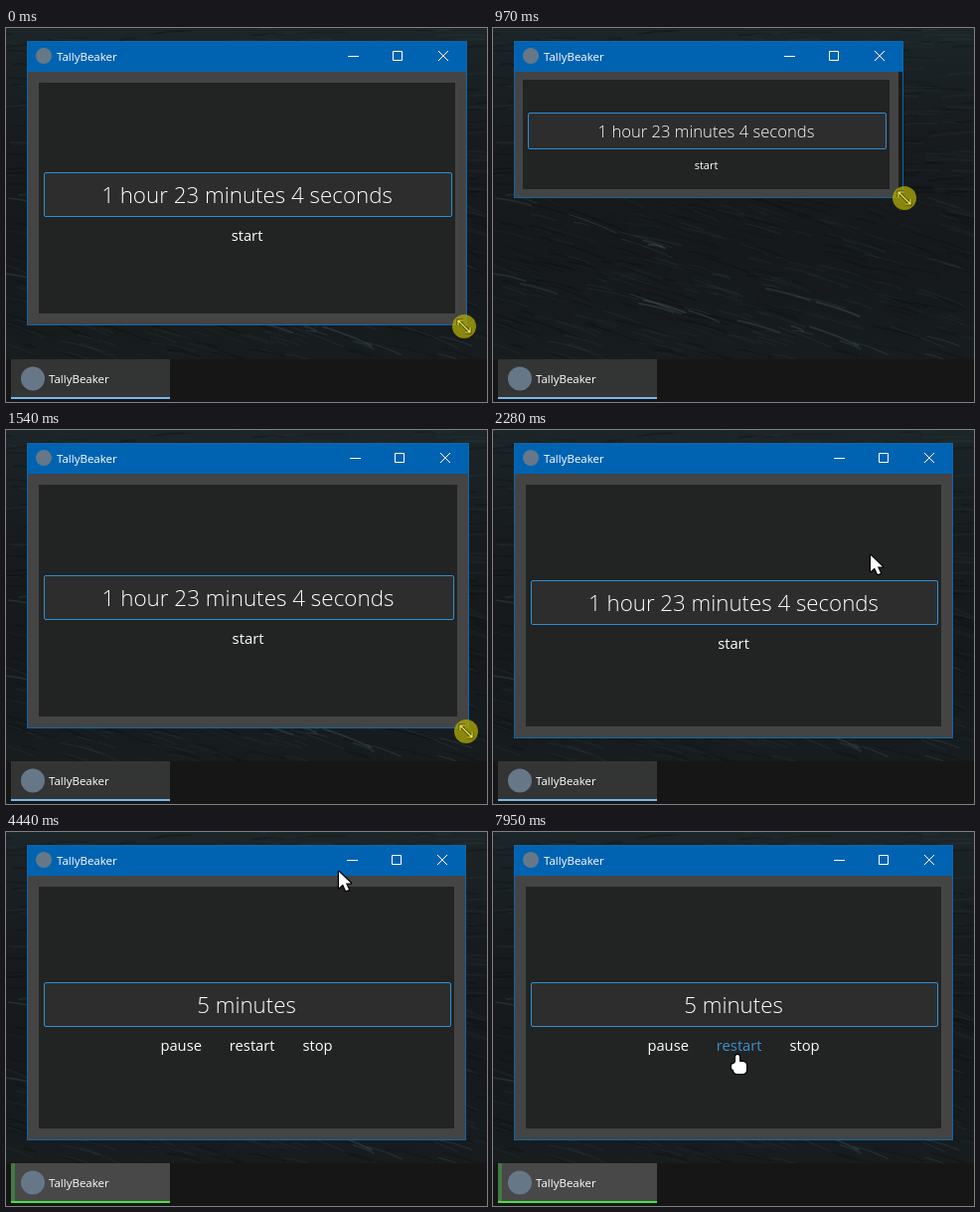
Recreate the animation shown at these times as an HTML page with a canvas. Size 484x376 px, loop 8000 ms.

```html
<!DOCTYPE html>
<html lang="en">
<head>
<meta charset="utf-8">
<title>Timer window</title>
<style>
html, body { margin: 0; width: 100%; height: 100%; overflow: hidden; background: #161616; }
canvas { display: block; width: 484px; height: 376px; }
</style>
</head>
<body>
<canvas id="stage" width="484" height="376"></canvas>
<script>
const W = 484, H = 376, SEA_H = 333, LOOP = 8000, TICK = 69.4;
const LEFT = 21, TOP = 13, BODY = 44;
const APP = 'TallyBeaker';
const LONG_TEXT = '1 hour 23 minutes 4 seconds';
const FONT = '"Open Sans", "Noto Sans", sans-serif';
const ICON = '#667888', BLUE = '#2f8fd4';

// Moments in ms
const RELEASE = 1648, FOCUS = 2480, SELECT = 3250, TYPE = 3380, BLINK = 3840;
const START = 4030, RESTART = 7230, HOVER = 5950;

const g = document.getElementById('stage').getContext('2d');

// Key points: tick, x, y
const cornerPath = [
  [0, 464, 298], [2, 462, 309], [5, 326, 274], [9, 291, 222],
  [14, 413, 170], [18, 470, 225], [22, 466, 299], [23, 463, 309]
];
const pointerPath = [
  [24, 444, 268], [32, 384, 121], [36, 368, 165], [43, 350, 23], [45, 329, 54],
  [62, 329, 54], [65, 323, 37], [74, 60, 112], [76, 5, 175], [81, 214, 271],
  [88, 246, 215], [113, 246, 215], [114, 246, 223]
];

// Smooth interpolation through the key points
function along(path, tick) {
  const last = path.length - 1;
  if (tick <= path[0][0]) return path[0].slice(1);
  if (tick >= path[last][0]) return path[last].slice(1);
  const i = path.findIndex(p => p[0] > tick) - 1;
  const a = path[i], b = path[i + 1], span = b[0] - a[0], u = (tick - a[0]) / span;
  const before = path[Math.max(0, i - 1)], after = path[Math.min(last, i + 2)];
  return [1, 2].map(c => {
    if (a[c] === b[c]) return a[c];
    const va = (b[c] - before[c]) / (b[0] - before[0]) * span;
    const vb = (after[c] - a[c]) / (after[0] - a[0]) * span;
    return a[c] * (2 * u ** 3 - 3 * u * u + 1) + b[c] * (3 * u * u - 2 * u ** 3)
      + va * (u ** 3 - 2 * u * u + u) + vb * (u ** 3 - u * u);
  });
}

function box(x, y, w, h, color) {
  g.fillStyle = color;
  g.fillRect(x, y, w, h);
}

function disc(x, y, r, color) {
  g.fillStyle = color;
  g.beginPath();
  g.arc(x, y, r, 0, 7);
  g.fill();
}

function setFont(size, weight = 400) {
  g.font = `${weight} ${size}px ${FONT}`;
}

function label(text, x, y, color = '#fff', align = 'left') {
  g.fillStyle = color;
  g.textAlign = align;
  g.fillText(text, x, y);
}

function sizeFor(text, width) {
  setFont(100, 350);
  return 100 * width / g.measureText(text).width;
}

// Fine seeded streaks, brighter along two sloping crests
function makeSea() {
  const canvas = document.createElement('canvas');
  canvas.width = W;
  canvas.height = H;
  const c = canvas.getContext('2d');
  const shade = c.createLinearGradient(0, 0, 0, SEA_H);
  ['#1c2528', '#171b1d', '#15191b', '#171c1e'].forEach((color, i) => shade.addColorStop(i / 3, color));
  c.fillStyle = shade;
  c.fillRect(0, 0, W, H);

  let seed = 11;
  const random = () => (seed = seed * 16807 % 2147483647) / 2147483647;
  for (let i = 0; i < 700; i++) {
    const x = random() * W, y = random() * SEA_H, length = 10 + random() * 45;
    const slope = (y > 170 ? .3 : 0) + (random() - .5) * .2;
    const distance = Math.min(Math.abs(y - 165 - .34 * x), Math.abs(y - 250 - .18 * x));
    const glow = .08 + .22 * Math.exp(-((distance / 5) ** 2));
    c.strokeStyle = random() < .4 ? 'rgba(8,10,11,.25)' : `rgba(85,115,118,${glow})`;
    c.lineWidth = .6 + random() * 1.6;
    c.beginPath();
    c.moveTo(x - length / 2, y - length * slope / 2);
    c.quadraticCurveTo(x, y - 2, x + length / 2, y + length * slope / 2);
    c.stroke();
  }
  c.fillStyle = '#161616';
  c.fillRect(0, SEA_H, W, H - SEA_H);
  return canvas;
}
const sea = makeSea();

function drawTaskbar(running) {
  box(5, SEA_H, 160, 40, running ? '#484848' : '#333434');
  if (running) box(5, SEA_H, 4, 38, '#437a43');
  box(5, 371, 160, 2, running ? '#4be046' : '#76b9ed');
  disc(27, 352.5, 12, ICON);
  setFont(11.5, 500);
  label(APP, 43, 357);
}

function drawTitleBar(right) {
  box(LEFT, TOP, right - LEFT, BODY - TOP, '#0063b1');
  disc(38, 28, 8, ICON);
  setFont(11.5, 500);
  label(APP, 51, 33);
  g.strokeStyle = '#fff';
  g.lineWidth = 1;
  g.beginPath();
  g.moveTo(right - 120, 28.5);
  g.lineTo(right - 109, 28.5);
  g.rect(right - 74.5, 23.5, 9, 9);
  g.moveTo(right - 29, 23);
  g.lineTo(right - 19, 33);
  g.moveTo(right - 19, 23);
  g.lineTo(right - 29, 33);
  g.stroke();
}

const elapsed = t => t - (t < RESTART ? START : RESTART);

function timerText(t) {
  if (t < TYPE) return LONG_TEXT;
  if (t < START) return '5';
  const seconds = Math.floor(elapsed(t) / 1000);
  return seconds < 1 ? '5 minutes' : `4 minutes ${60 - seconds} seconds`;
}

function drawActions(t, cx, y, size) {
  const names = t < START ? ['start'] : ['pause', 'restart', 'stop'];
  const gap = size * 1.89;
  setFont(size);
  const widths = names.map(n => g.measureText(n).width);
  let x = cx - (widths.reduce((a, b) => a + b) + gap * (names.length - 1)) / 2;
  names.forEach((name, i) => {
    label(name, x, y, name === 'restart' && t >= HOVER ? '#3a94d0' : '#fff');
    x += widths[i] + gap;
  });
}

function drawField(t, x0, x1, y0, y1, textWidth) {
  const cx = (x0 + x1) / 2;
  const height = Math.round(12 + textWidth * .1125);
  const y = Math.floor((y0 + y1 - height) / 2 - 3), middle = y + height / 2;
  g.beginPath();
  g.roundRect(x0 + 5.5, y + .5, x1 - x0 - 9, height - 1, 1.5);
  g.fillStyle = '#2d2d2d';
  g.fill();
  g.strokeStyle = BLUE;
  g.lineWidth = t >= FOCUS && t < START ? 2 : 1;
  g.stroke();

  const text = timerText(t), size = sizeFor(LONG_TEXT, textWidth);
  setFont(size, 350);
  const half = g.measureText(text).width / 2;
  if (t >= SELECT && t < TYPE) box(cx - half - 1, middle - 15, half * 2 + 1, 31, '#555');
  label(text, cx, middle + size * .375, '#fff', 'center');
  if (t >= SELECT && t < BLINK) box(Math.round(cx + half), middle - 15, 1, 31, '#fff');
  drawActions(t, cx, y + height + 6 + textWidth * .062, textWidth * .0505);
}

// While the window grows, its content trails the right edge
function drawWindow(t, right, bottom, lag) {
  const inner = right - lag;
  drawTitleBar(right);
  box(LEFT, BODY, right - LEFT, bottom - BODY, '#191c1d');
  box(LEFT, BODY, inner - LEFT, bottom - BODY, '#444');
  if (t >= START) box(LEFT, BODY, Math.floor(elapsed(t) * 440 / 300000), bottom - BODY, BLUE);
  g.lineWidth = 1;
  g.strokeStyle = '#0f66ad';
  g.strokeRect(LEFT + .5, TOP + .5, right - LEFT - 1, bottom - TOP);

  const textWidth = Math.min((inner - LEFT) * .661, (bottom - 12) * 1.38);
  const margin = Math.round(textWidth * .041);
  const x0 = LEFT + margin, x1 = inner - margin;
  const y0 = BODY - 1 + margin, y1 = bottom + 1 - margin;
  box(x0, y0, x1 - x0, y1 - y0, '#222323');
  drawField(t, x0, x1, y0, y1, textWidth);
}

// Each shape is drawn around its hot spot
const arrow = new Path2D('M1 1V17L5 13.5 8 20 11 19 8 12.5H13Z');
const doubleArrow = new Path2D('M-6-6L6 6M-6-1V-6H-1M6 1V6H1');
const beam = new Path2D('M-3-8.5H4M.5-8V8M-3 8.5H4');
const hand = new Path2D();
hand.roundRect(-2, 1, 4, 14, 2);
hand.roundRect(-4, 8, 13, 12, 4);
hand.roundRect(-6, 10, 5, 6, 2);

function outlined(shape) {
  g.lineJoin = 'round';
  g.lineWidth = 2.5;
  g.strokeStyle = '#000';
  g.stroke(shape);
  g.fillStyle = '#fff';
  g.fill(shape);
}

function lines(shape, color, width) {
  g.strokeStyle = color;
  g.lineWidth = width;
  g.stroke(shape);
}

function drawPointer(t, x, y) {
  g.save();
  g.translate(x, y);
  if (t < RELEASE) {
    disc(0, 0, 12, 'rgba(172,166,8,.78)');
    lines(doubleArrow, '#4a4708', 3);
    lines(doubleArrow, '#f4ef4a', 1.2);
  } else if (t < SELECT && y > 152 && y < 195) {
    lines(beam, '#ddd', 1);
  } else {
    outlined(t < HOVER ? arrow : hand);
  }
  g.restore();
}

function draw(t) {
  const tick = Math.floor(t / TICK + .25);
  const [right, bottom] = along(cornerPath, tick).map(Math.round);
  const growth = right - along(cornerPath, tick - 1)[0];
  const [leadX, leadY] = along(cornerPath, tick + .2);
  const [x, y] = t < RELEASE ? [leadX - 3, leadY + 1] : along(pointerPath, tick);

  g.drawImage(sea, 0, 0);
  drawTaskbar(t >= START);
  drawWindow(t, right, bottom, Math.round(Math.max(0, growth) * .22));
  drawPointer(t, Math.round(x), Math.round(y));
}

const begin = performance.now();
function frame() {
  draw((performance.now() - begin) % LOOP);
  requestAnimationFrame(frame);
}
frame();
</script>
</body>
</html>
```
